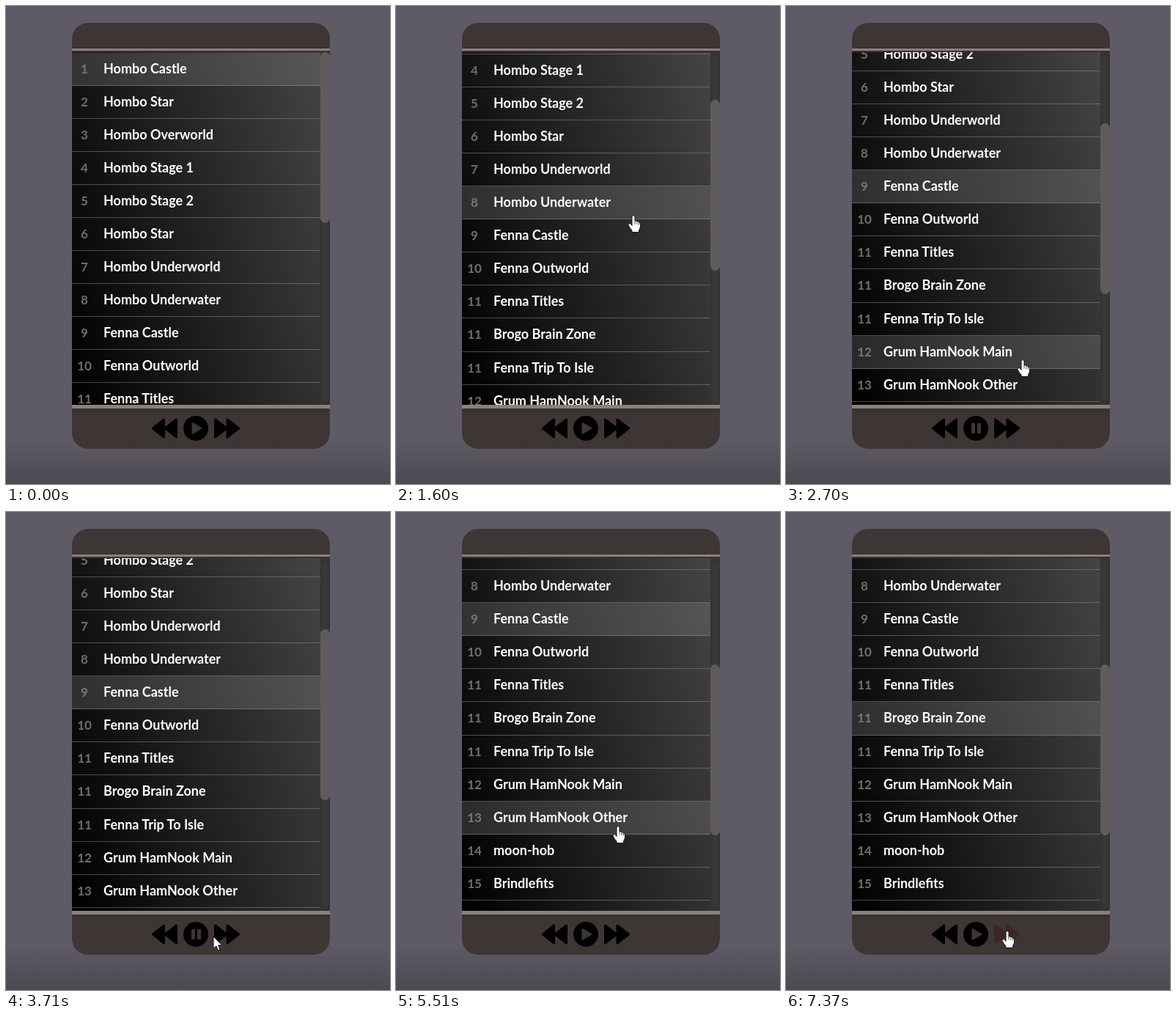
Animation of 524 by 652 pixels, one loop 8000 ms. Source, as an HTML page:

```html
<!DOCTYPE html>
<html lang="en">
<head>
<meta charset="utf-8">
<title>Music player</title>
<style>
  html, body { margin: 0; width: 100%; height: 100%; overflow: hidden; }
  body { background: linear-gradient(#5e5b66 0 590px, #4c4952 652px); }
  #stage { position: relative; width: 524px; height: 652px; overflow: hidden; }
  #stage > * { position: absolute; }
  #player { left: 90px; top: 23px; width: 352px; height: 581px; border-radius: 22px; background: #3d3635; }
  .bar { left: 90px; width: 352px; background: #8b807b; }
  #head { top: 58px; height: 3px; box-shadow: 0 2px #373130; }
  #foot { top: 544px; height: 5px; box-shadow: 0 6px #37342f; }
  #list { left: 90px; top: 63px; width: 339px; height: 481px; overflow: hidden;
    background: linear-gradient(75deg, #000, #444); }
  #rows { position: absolute; top: 0; left: 0; width: 100%; }
  .row { position: absolute; left: 0; width: 100%; box-sizing: border-box;
    border-bottom: 1px solid rgba(150, 158, 155, .45);
    font: 700 18px/43px Lato, "Open Sans", sans-serif; color: #fff; white-space: pre; }
  .row.lit { background: rgba(128, 128, 128, .3); }
  .row b { position: absolute; left: 0; width: 34px; text-align: center; font-size: 17px; color: #786c6a; }
  .row.lit b { color: #777; }
  .row span { position: absolute; left: 43px; }
  .scroll { left: 429px; top: 63px; width: 13px; height: 481px; border-radius: 7px; }
  #track { background: #3a3a3a; box-shadow: inset 0 0 6px rgba(0, 0, 0, .3); }
  #thumb { height: 233px; background: #605c5b; }
  svg { left: 0; top: 0; }
  .btn { fill: #000; stroke: #000; stroke-width: 3; stroke-linejoin: round; }
  .btn.lit { fill: #3d2526; stroke: #3d2526; }
  .glyph { fill: #3d3635; stroke: #3d3635; stroke-linejoin: round; }
</style>
</head>
<body>
<div id="stage">
  <div id="player"></div>
  <div id="list"><div id="rows"></div></div>
  <div class="scroll" id="track"></div>
  <div class="scroll" id="thumb"></div>
  <div class="bar" id="head"></div>
  <div class="bar" id="foot"></div>
  <svg width="524" height="652">
    <path class="btn" id="prev" d="M200.5 576L215.5 564V588ZM217 576L232.5 564V588Z"/>
    <circle class="btn" id="toggle" cx="259" cy="576" r="15.5"/>
    <path class="glyph" id="play" stroke-width="2" d="M254.5 569V583L266.5 576Z"/>
    <path class="glyph" id="pause" d="M253.5 569.5h4v13h-4zM261.5 569.5h4v13h-4z"/>
    <path class="btn" id="next" d="M285.5 564L301 576L285.5 588ZM302 564L317.5 576L302 588Z"/>
    <g id="hand" stroke="#111" stroke-linejoin="round">
      <path fill="#fff" d="M-2 1.8Q0-1 2 1.8V8.2Q4 7.2 4.8 9Q7 8.4 7.4 10.2Q9.5 10 9.5 12.5V16Q9.3 18 7.6 20.5V23.5H-2V21Q-5 18-7 14Q-7.5 11-4.6 11.6L-2 14.4Z"/>
      <path fill="none" stroke-width=".7" d="M2 8.5v4M4.8 9.5v3.5M7.3 10.7v3"/>
    </g>
    <path id="arrow" fill="#fff" stroke="#111" d="M0 0V16.5L3.8 13L6.3 18.8L9 17.6L6.5 12H11.6Z"/>
  </svg>
</div>
<script>
const LOOP = 8000, STEP = 77, TOP = 63, PITCH = 45, NOTCH = 100;
const $ = id => document.getElementById(id);
const clamp = (v, lo, hi) => Math.max(lo, Math.min(hi, v));
const passed = (times, t) => times.filter(at => t >= at).length;
const steps = (from, t) => Math.floor((t - from + 8) / STEP);

const songs = ['Hombo Castle', 'Hombo Star', 'Hombo Overworld', 'Hombo Stage 1', 'Hombo Stage 2',
  'Hombo Star', 'Hombo Underworld', 'Hombo Underwater', 'Fenna Castle', 'Fenna Outworld',
  'Fenna Titles', 'Brogo Brain Zone', 'Fenna Trip To Isle', 'Grum HamNook Main',
  'Grum HamNook Other', 'moon-hob', 'Brindlefits'];

const wheelAt = [990, 1600, 5190];
const pickAt = 2390, picked = 8, pauseAt = 4490;
const nextAt = [6060, 6590, 7300];

// pointer moves: start, end, x, y
const entry = [477, 634];
const moves = [
  [70, 760, 324, 285], [1757, 2000, 256, 271], [2000, 2230, 241, 251],
  [2390, 2700, 323, 482], [2700, 3160, 310, 604], [3330, 3860, 273, 570],
  [4730, 4880, 272, 450], [4880, 5040, 274, 385], [5348, 5510, 303, 428],
  [5510, 5980, 302, 568], [6290, 6440, 311, 571], [6590, 6760, 302, 571]
];

// the number 11 appears on three rows; row 12 is a pixel taller
const number = i => i + 1 - clamp(i - 10, 0, 2);
const rowTop = i => 1 + PITCH * i + Math.floor(i / 12);

const rows = songs.map((name, i) => {
  const row = document.createElement('div');
  row.className = 'row';
  row.style.top = rowTop(i) + 'px';
  row.style.height = rowTop(i + 1) - rowTop(i) + 'px';
  row.innerHTML = `<b>${number(i)}</b><span>${name}</span>`;
  return $('rows').appendChild(row);
});

function pointer(t) {
  let [x, y] = entry;
  for (const [from, to, toX, toY] of moves) {
    if (t < from) break;
    const k = t >= to ? 1 : clamp(steps(from, t) * STEP / (to - from), 0, 1);
    x += (toX - x) * k;
    y += (toY - y) * k;
  }
  return [Math.round(x), Math.round(y)];
}

// each wheel notch glides over three steps
const scrollAt = t => wheelAt.reduce((sum, at) =>
  sum + (t < at ? 0 : NOTCH * clamp(steps(at, t) + 1, 0, 3) / 3), 0);

const show = (id, on) => $(id).style.display = on ? '' : 'none';

function draw(t) {
  const scroll = scrollAt(t);
  const active = t < pickAt ? 0 : picked + passed(nextAt, t);
  const playing = t >= pickAt && t < pauseAt;
  const [x, y] = pointer(t);

  // hover only follows the list once a scroll has settled
  const inList = x >= 90 && x < 429 && y >= TOP && y < 544;
  const pos = y - TOP + Math.floor(scroll / NOTCH) * NOTCH;
  rows.forEach((row, i) => {
    const hover = inList && pos >= rowTop(i) && pos < rowTop(i + 1);
    row.classList.toggle('lit', hover || i === active);
  });
  $('rows').style.transform = `translateY(${-Math.round(scroll)}px)`;
  $('thumb').style.transform = `translateY(${Math.round(scroll * .484)}px)`;

  const overToggle = Math.hypot(x - 259, y - 576) < 17;
  const overNext = x > 283 && x < 320 && y > 561 && y < 591;
  $('toggle').classList.toggle('lit', overToggle);
  $('next').classList.toggle('lit', overNext);
  show('pause', playing);
  show('play', !playing);

  const hand = inList || overToggle || overNext;
  show('hand', hand && t >= moves[0][0]);
  show('arrow', !hand && t >= moves[0][0]);
  $(hand ? 'hand' : 'arrow').setAttribute('transform', `translate(${x} ${y})`);
}

const start = performance.now();
function tick() {
  draw((performance.now() - start) % LOOP);
  requestAnimationFrame(tick);
}
tick();
</script>
</body>
</html>
```
